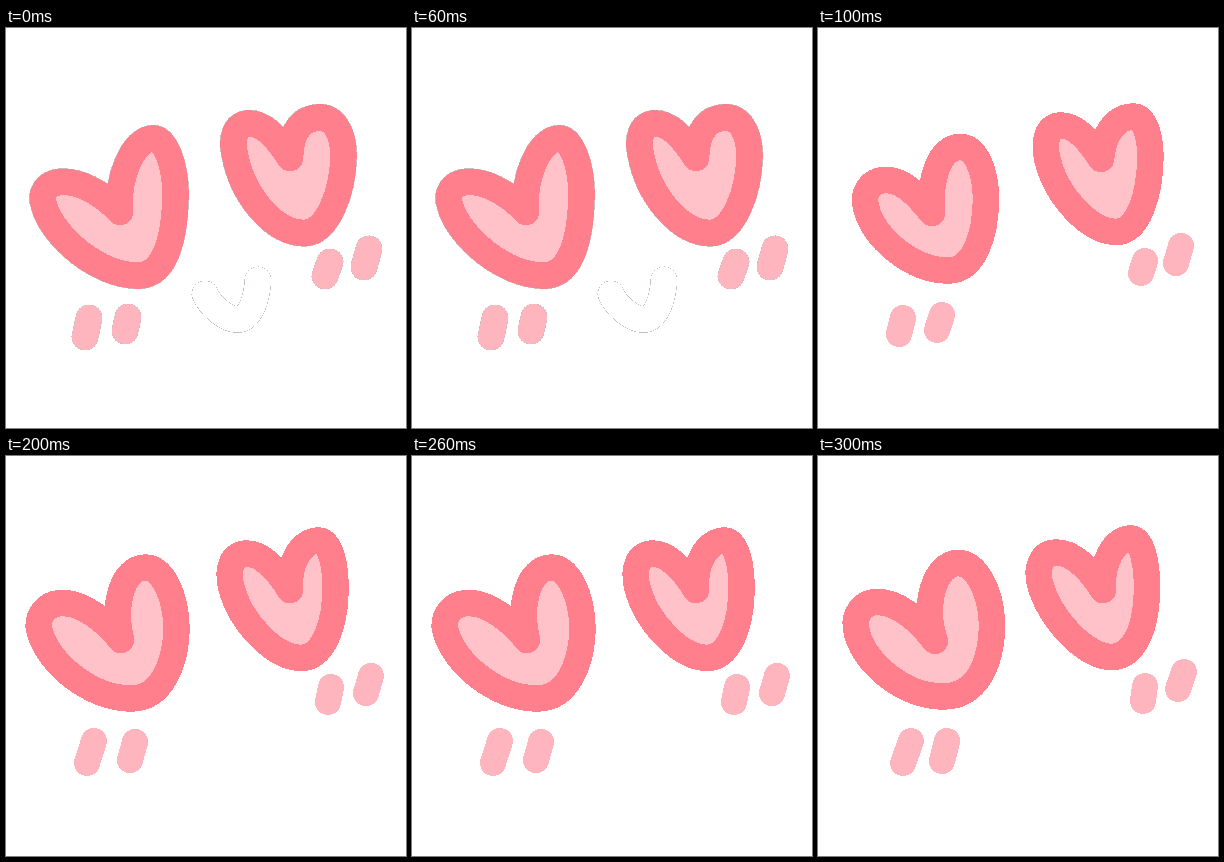
An HTML page without scripts that plays this animation: 400x400 px, repeating every 400 ms.

```html
<!DOCTYPE html>
<html lang="en">
<head>
<meta charset="utf-8">
<title>Heart eyes</title>
<style>
  html, body { margin: 0; width: 100%; height: 100%; overflow: hidden; background: #fff; }
  svg { display: block; width: 100vw; height: 100vh; shape-rendering: crispEdges; }
  path { fill: none; stroke-width: calc(26px + var(--grow, 0px)); stroke-linecap: round; stroke-linejoin: round; }
  .heart { fill: #ffc2c9; stroke: var(--rim, #ff808c); stroke-width: calc(26.5px + var(--grow, 0px)); }
  .blush { stroke: var(--rim, #ffb5bd); }
  .smile { stroke: var(--rim, #fff); }
  .edge { --rim: #c8bcbe; --grow: 1px; }

  /* four hand-drawn poses, 100 ms each, hard cuts */
  .pose { visibility: hidden; animation: show 400ms step-end infinite; animation-delay: calc(var(--i) * 100ms - 400ms); }
  @keyframes show {
    0% { visibility: visible; }
    25%, 100% { visibility: hidden; }
  }
</style>
</head>
<body>
<svg viewBox="0 0 400 400">
  <g class="pose" style="--i:0">
    <!-- thin grey rim, seen only in this pose -->
    <use href="#smiling" class="edge"/>
    <g id="smiling">
      <path class="heart" d="M114 184C95 164 73 153 55 154C40 155 34 166 38 177C46 208 92 248 133 247.5C163 246 169 200 169.5 165C169 138 160 111 147 110.5C127 111 111 150 114 184Z"/>
      <path class="heart" d="M284 130C269 107 257 95 242 95.5C229 97 225 111 229 127C236 165 266 205 299 205C321 204 337 165 337.5 127C337 103 327 89.5 314 89.5C294 90 285 105 284 130Z"/>
      <path class="smile" d="M199 266C205 279 220 291 231 291.5C245 291 251 270 252 252"/>
      <path class="blush" d="M83 290L79 309M122 289L119 303M324 234L319 248M363 221L358 239"/>
    </g>
  </g>

  <g class="pose" style="--i:1">
    <path class="heart" d="M114 185C100 168 86 152 68 152C52 152 44 166 48 179C54 209 94 243 131 242.5C157 242 167.5 205 168 172C168 143 158 119 142 119C122 119 111 150 114 185Z"/>
    <path class="heart" d="M283 131C269 109 256 97 242 97.5C229 98 226 113 229 130C237 166 270 204 299 204C320 203 332 168 332.5 128C332 103 325 88.5 315 88.5C297 89 285 107 283 131Z"/>
    <path class="blush" d="M85 290L81 306M124 287L119 302M327 233L323 245M363 218L358 235"/>
  </g>

  <g class="pose" style="--i:2">
    <path class="heart" d="M115 184C100 165 77 147 57 147C40 147 31 160 33 173C41 208 86 243 126 242.5C157 242 170 205 170.5 172C170 140 157 111.5 139 111.5C117 112 106 148 115 184Z"/>
    <path class="heart" d="M284 134C270 111 254 97 240 97.5C226 98 221 113 225 130C233 164 267 202 296 202C317 201 330 170 329.5 128C329 101 322 84.5 312 84.5C295 85 282 107 284 134Z"/>
    <path class="blush" d="M88 285L81 307M129 286L124 304M325 231L322 246M365 220L360 237"/>
  </g>

  <g class="pose" style="--i:3">
    <path class="heart" d="M117 185C101 164 80 146 60 146C44 146 36 159 38 172C43 206 86 241 126 240.5C159 240 174 207 174 167C173 137 159 107 140 107C117 107 104 150 117 185Z"/>
    <path class="heart" d="M285 134C270 110 253 96 238 96.5C223 97 218 112 222 128C232 163 267 201 294 201C317 200 329.5 171 329 127C328 99 322 82.5 312 82.5C296 83 283 107 285 134Z"/>
    <path class="blush" d="M93 285L85 307M129 285L124 305M327 230L325 245M366 216L360 233"/>
  </g>
</svg>
</body>
</html>
```
